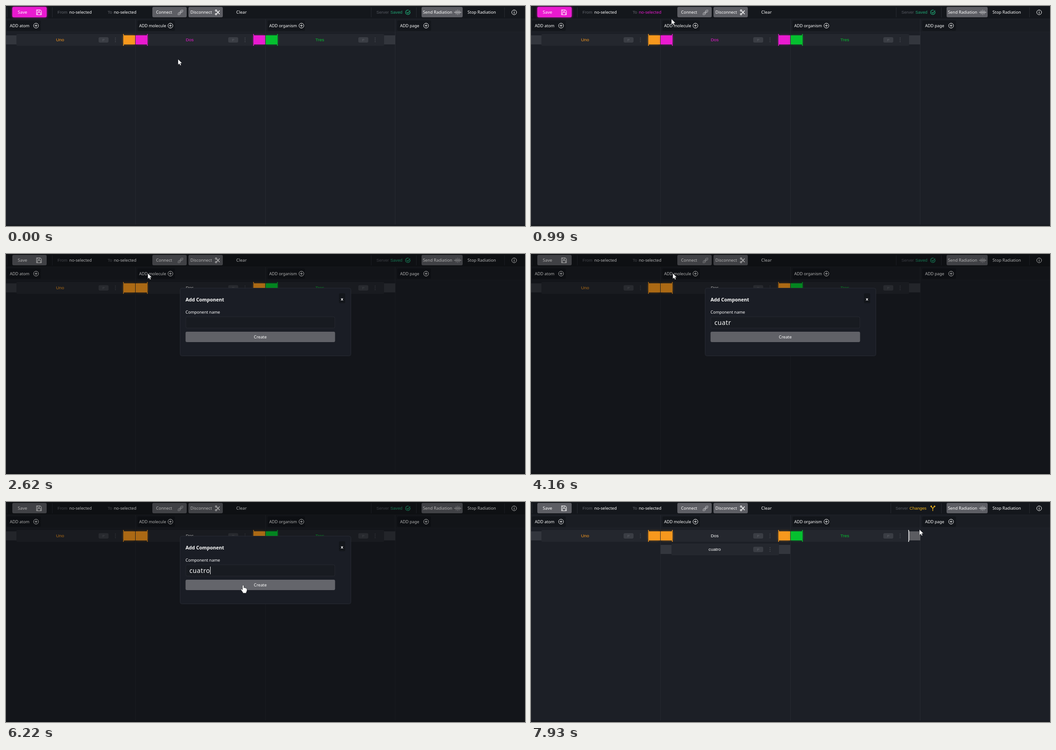
Animation, 1149 px wide and 487 px high, one loop 8000 ms. Source, as an HTML page:

```html
<!DOCTYPE html>
<html lang="en">
<head>
<meta charset="utf-8">
<title>Component board</title>
<style>
html, body { margin: 0; width: 100%; height: 100%; overflow: hidden; background: #1c1f26; }
svg { display: block; width: 1149px; height: 487px; }
text { font: 9.2px "Noto Sans", sans-serif; white-space: pre; }
.alt { font: 9.4px "Liberation Sans", Arial, sans-serif; }
.typed { font-size: 14.2px; letter-spacing: .5px; }
.title { font-size: 10.6px; font-weight: 700; }
</style>
</head>
<body>
<svg id="stage" viewBox="0 0 1149 487"></svg>
<script>
const LOOP = 8000, TICK = 77, LEAD = 11;
const MAGENTA = '#ea1ad0', ORANGE = '#f7981d', GREEN = '#05c02f', WHITE = '#ffffff';
const GREY = '#5d5e64', GREY_HOVER = '#686970', SOCKET = '#33363d', DARK = '#13161b';
const stage = document.getElementById('stage');

// Pointer path: [tick, x, y]
const PATH = [
  [0, 381, 118], [3, 381, 97], [6, 367, 52], [8, 349, 20], [10, 300, 14], [11, 285, 14],
  [12, 290, 15], [13, 311, 29], [16, 309, 35], [18, 313, 41], [19, 314, 43], [68, 314, 43],
  [69, 322, 52], [72, 470, 160], [74, 525, 182], [76, 525, 182], [77, 525, 181], [78, 525, 181],
  [79, 525, 183], [81, 525, 184], [91, 525, 184], [92, 530, 187], [95, 620, 190],
  [97, 705, 188], [99, 798, 115], [101, 835, 76], [102, 847, 65], [103, 860, 61], [999, 860, 61]
];
const KEYS = [42, 45, 47, 50, 52, 58];
const CARET = [[30, 34], [40, 54], [58, 61], [67, 74], [79, 85]];
const OPEN = 26, PRESS = 85, CLOSE = 87;

const within = (n, a, b) => n >= a && n < b;
const clamp = v => Math.max(0, Math.min(1, v));

function mix(a, b, k) {
  const ch = (c, i) => parseInt(c.substr(1 + i * 2, 2), 16);
  return 'rgb(' + [0, 1, 2].map(i => Math.round(ch(a, i) + (ch(b, i) - ch(a, i)) * k)) + ')';
}

function pointer(n) {
  const i = PATH.findIndex(p => p[0] > n);
  const [n0, x0, y0] = PATH[i - 1], [n1, x1, y1] = PATH[i];
  const k = (n - n0) / (n1 - n0);
  return [Math.round(x0 + (x1 - x0) * k), Math.round(y0 + (y1 - y0) * k)];
}

const rect = (x, y, w, h, fill, r = 0, extra = '') =>
  `<rect x="${x}" y="${y}" width="${w}" height="${h}" rx="${r}" fill="${fill}" ${extra}/>`;
const text = (x, y, s, fill = WHITE, extra = '') =>
  `<text x="${x}" y="${y}" fill="${fill}" ${extra}>${s}</text>`;
const line = (d, color, w = 1, extra = '') =>
  `<path d="${d}" fill="none" stroke="${color}" stroke-width="${w}" ${extra}/>`;
const glow = (x, y, w, h, fill, o = 1) => rect(x, y, w, h, fill, 3, `filter="url(#glow)" opacity="${o}"`);
const vline = (x, y0, y1, color) => rect(x, y0, 1, y1 - y0, color);

function button(x, w, fill, lit) {
  return (lit ? glow(x, 2, w, 23, MAGENTA, .8) : '') + rect(x, 2, w, 23, lit ? MAGENTA : fill, 3);
}

function addButton(x, w, label, iconX, hover = 0, lit = 0) {
  const base = hover ? '#30333a' : DARK;
  return glow(x, 32, w, 23, MAGENTA, .8 * lit) +
    rect(x, 32, w, 23, lit ? mix(base, MAGENTA, lit) : base, 3) +
    text(x + (w < 80 ? 6.5 : 3.7), 47, 'ADD ' + label, WHITE, 'style="font-size:9px"') +
    `<circle cx="${iconX}" cy="43.5" r="5.4" fill="none" stroke="#fff"/>` +
    line(`M${iconX - 3} 43.5h6M${iconX} 40.5v6`, WHITE);
}

// Socket with a flared bracket on its inner edge; dir is +1 when that edge is on the right
function socket(x, y, color, dir, shine = true) {
  const e = dir > 0 ? x + 25.5 : x + .5;
  return (shine ? glow(x, y, 26, 20, color, .6) : '') + rect(x, y, 26, 20, color) +
    line(`M${e + dir} ${y - 3}q${-dir} 1 ${-dir} 4v18q0 3 ${dir} 4`, shine ? color : WHITE, 1.6);
}

function card(x, y, x0, x1, name, color) {
  const chip = x + 205, dots = x + 242;
  return rect(x, y + 3, 24, 20, SOCKET) + rect(x0, y, x1 - x0, 26, '#24272e', 2) +
    rect(x + 262, y + 3, 25, 20, SOCKET) +
    text(x + 119.7, y + 16.4, name, color, 'class="alt" text-anchor="middle" style="font-size:9.8px"') +
    rect(chip, y + 7, 22, 12, '#3a3d44', 3) +
    text(chip + 11, y + 16, 'P', '#5d6067', 'class="alt" text-anchor="middle" style="font-size:8px"') +
    [9, 13, 17].map(d => rect(dots - .5, y + d - .8, 1.6, 1.6, '#50535a')).join('');
}

function icons(changed) {
  const floppy = line('M67.5 8.5h8.5l2.5 2.5v8.5h-11zM70 8.5v3.5h5v-3.5M69.5 19.5v-5h7v5', WHITE);
  const chain = line('M386 11.5l2.5-2.5h3v3l-2.5 2.5h-3zM381 16.5l2.5-2.5h3v3l-2.5 2.5h-3zM383.5 17l5.5-5.5', '#a9aaae', 1.2);
  const shears = line('M466 10.5L473 18M466 17.5L473 10', WHITE, 1.5) +
    [10, 18].map(y => `<circle cx="465" cy="${y}" r="1.7" fill="none" stroke="#fff" stroke-width="1.2"/>`).join('');
  let wave = '';
  for (let i = -4; i <= 4; i++) {
    const h = [6, 3, 4.5, 2, 1][Math.abs(i)];
    wave += `M${1000 + i * 1.8} ${14 - h}v${2 * h}`;
  }
  const state = changed
    ? line('M889.5 20v-5q0-2-2-3l-1.5-1.5v-2M889.5 15q0-2 2-3t2-3M884.5 10.5l1.5-2 1.5 2M891.5 10.5l2-2 1.5 2', '#efb41e', 1.4)
    : line('M894.4 12.4A5 5 0 1 1 891.5 9.3M887 13.5l2.5 2.7 5-6.2', '#1fa573', 1.3);
  return floppy + chain + shears + line(wave + 'M992 14h16', '#b9babd', .8) + state +
    '<circle cx="1125" cy="14" r="5.3" fill="none" stroke="#fff"/>' + line('M1125 13v4M1125 10.7v1.3', WHITE, 1.2);
}

function toolbar(n, x, y) {
  const changed = n >= CLOSE, sx = changed ? 807 : 820;
  const toColor = n < 10 ? WHITE : mix(MAGENTA, WHITE, clamp((n - 13) / 3));
  const overConnect = x >= 324 && x < 400 && y >= 2 && y < 25;
  return rect(0, 0, 1149, 28, '#14171c') + rect(0, 28, 1149, 1, '#20232a') +
    [2, 102, changed ? 796 : 808, 908, 1103].map(v => vline(v, 3, 25, '#272a31')).join('') +
    button(14, 76, GREY, n < 24) + button(324, 76, overConnect ? GREY_HOVER : GREY) +
    button(404, 76, GREY) + button(920, 91, GREY) +
    text(26, 17.3, 'Save', WHITE, 'style="font-size:9.6px"') +
    text(114, 17.2, 'From', '#62656c', 'class="alt"') + text(140, 17.2, 'no-selected') +
    text(225, 17.2, 'To', '#62656c', 'class="alt"') + text(238.7, 17.2, 'no-selected', toColor) +
    text(332.3, 17.3, 'Connect') + text(408.3, 17.3, 'Disconnect') +
    text(509.8, 17.3, 'Clear', WHITE, 'style="font-size:9.5px"') +
    text(sx, 17.2, 'Server', '#555860', 'class="alt"') +
    text(sx + 31, 17.2, changed ? 'Changes' : 'Saved', changed ? '#efb41e' : '#1fa573', 'class="alt"') +
    text(923, 17.3, 'Send Radiation') + text(1021.8, 17.3, 'Stop Radiation') + icons(changed);
}

function board(n, k) {
  const link = mix(MAGENTA, ORANGE, k);
  const lit = n < 24 ? 0 : 1 - k;
  return rect(0, 29, 1149, 29, '#1a1d23') + rect(0, 57, 1149, 1, '#20232a') +
    rect(0, 484, 1149, 3, '#16191f') +
    [286, 574, 861].map(v => vline(v, 29, 484, '#262930')).join('') +
    addButton(2, 75, 'atom', 66.5) + addButton(291, 83, 'molecule', 364, within(n, 16, 26), lit) +
    addButton(579, 83, 'organism', 654) + addButton(866, 75, 'page', 930) +
    card(0, 62, 23, 260, 'Uno', ORANGE) + card(287, 62, 313, 548, 'Dos', mix(MAGENTA, WHITE, k)) +
    card(575, 62, 601, 837, 'Tres', GREEN) +
    socket(260, 65, ORANGE, -1) + socket(287, 65, link, 1) +
    socket(548, 65, link, -1) + socket(575, 65, GREEN, 1) +
    vline(286, 62, 88, '#262930') + vline(574, 62, 88, '#262930') +
    (n >= CLOSE ? card(287, 92, 311, 549, 'cuatro', WHITE) : '') +
    (n >= 103 ? socket(836, 65, '#5b5c61', -1, false) : '');
}

function dialog(n, k, overCreate) {
  const typed = 'cuatro'.slice(0, KEYS.filter(t => n >= t).length);
  const pressed = n >= PRESS;
  const fill = pressed ? MAGENTA : overCreate ? '#64656b' : '#606167';
  return rect(0, 0, 1149, 487, '#000', 0, `opacity="${.31 * k}"`) + `<g opacity="${k}">` +
    rect(385.5, 75.5, 378, 150, '#1a1d25', 4, 'stroke="#272a33"') +
    rect(737, 87, 14, 22, DARK, 3) +
    text(744, 102.6, 'x', WHITE, 'text-anchor="middle" style="font-weight:700"') +
    text(397.5, 105.3, 'Add Component', WHITE, 'class="title"') +
    text(397.5, 132, 'Component name', WHITE, 'style="font-size:9px"') +
    rect(398, 139, 330, 25, '#181b21', 3, 'stroke="#262931"') +
    text(406, 157.2, typed, WHITE, 'class="typed" id="typed"') +
    (CARET.some(c => within(n, c[0], c[1])) ? '<rect id="caret" y="143" width="1" height="17" fill="#fff"/>' : '') +
    (pressed ? glow(398, 172, 330, 23, MAGENTA, .8) : '') + rect(397.5, 172, 331, 23, fill, 3) +
    text(563, 187.2, 'Create', WHITE, 'text-anchor="middle"') + '</g>';
}

function cursor(x, y, hand) {
  const d = hand
    ? 'M-1.5 1.2q1.5-2.2 3 0v4.6q1.6-.8 2.4.4 1.7-.5 2.3.8 2.3-.2 2.3 2.2v3.3l-1.7 3.9v1.4h-7.3v-1.2l-4-5.8q-1-1.8.2-2.4 1-.4 2.8 2z'
    : 'M0 0V12L2.8 9.5L4.8 13.6L6.7 12.7L4.9 8.8L8.6 8.5Z';
  return `<path d="${d}" transform="translate(${x} ${y})" fill="#fff" stroke="#0b0c10" stroke-width="${hand ? .6 : .3}"/>`;
}

const DEFS = '<defs><filter id="glow" x="-50%" y="-50%" width="200%" height="200%"><feGaussianBlur stdDeviation="2.6"/></filter></defs>';

function draw(n) {
  const [x, y] = pointer(n);
  const k = clamp((n - OPEN) / 4);
  const open = n > OPEN && n < CLOSE;
  const overCreate = open && x >= 398 && y >= 172;
  stage.innerHTML = DEFS + rect(0, 0, 1149, 487, '#1c1f26') + board(n, k) + toolbar(n, x, y) +
    (open ? dialog(n, k, overCreate) : '') + cursor(x, y, overCreate);
  const caret = document.getElementById('caret');
  if (caret) {
    const w = document.getElementById('typed').getComputedTextLength();
    caret.setAttribute('x', Math.floor(406.8 + w));
  }
}

let shown = -1;
function tick() {
  const n = Math.min(103, Math.floor((performance.now() % LOOP + LEAD) / TICK));
  if (n !== shown) draw(shown = n);
  requestAnimationFrame(tick);
}
tick();
</script>
</body>
</html>
```
